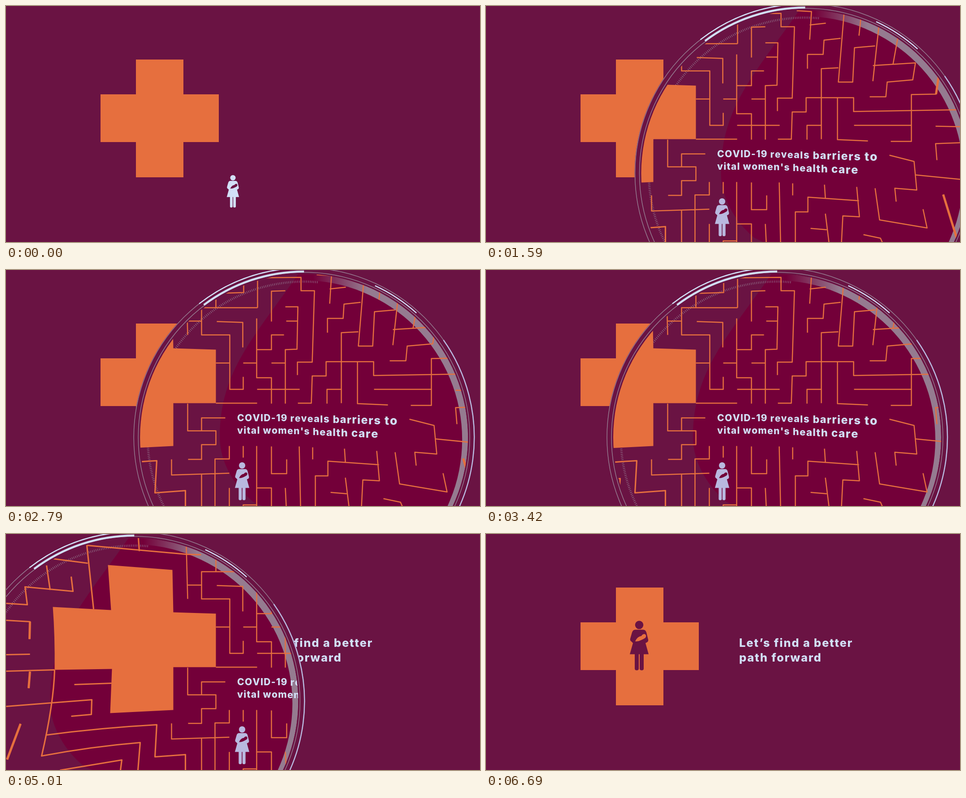
These frames come from a looping animation (1058x529 px, 6.72 s). An HTML page with a canvas:

```html
<!DOCTYPE html>
<html lang="en">
<head>
<meta charset="utf-8">
<title>A better path forward</title>
<style>
html, body { margin: 0; width: 100%; height: 100%; overflow: hidden; background: #6a1343; }
canvas { display: block; }
</style>
</head>
<body>
<canvas id="stage" width="1058" height="529"></canvas>
<script>
const ctx = document.getElementById('stage').getContext('2d');
const W = 1058, H = 529, LOOP = 6720, SWAP_TIME = 4400;
const BG = '#6a1343', CRIMSON = '#730039', ORANGE = '#e66f3e';
const PALE = '#d2dff7', LAVENDER = '#b9b8df', GREY = '#957b90';
const LENS_Y = 375, LENS_R = 381, GLASS_R = 366;

// Lens centre over time: quick entrance, slow drift, quick exit.
const lensKeys = [
  [390, 1442], [1020, 865], [1080, 840], [1710, 700], [2130, 683], [3420, 650],
  [3780, 640], [4380, 552.5], [4470, 528], [5010, 287], [5490, -390]
];

// The maze seen through the glass, by region.
const mazeLeft = new Path2D(`M195 168L180 25L402 45L435 46M295 8L297 38M105 55L182 65M90 70L98 125
  M145 95L149 128L42 118L47 158L0 155M0 193L53 196L52 235M0 270L53 269M0 307L108 304M53 308L50 345
  M152 337L235 334M108 304Q106 380 79 497Q190 476 299 467L294 529M0 386L101 378L191 371L190 404L145 408
  M90 450Q210 434 336 427L332 499L400 494V529M120 529L258 506L255 529M32 425L2 505`);
const mazeCentre = new Path2D(`M402 28L405 145M405 114H436M498 13V18H530V50L468 52V84M499 208H468
  M561 84H436V145H499V267H529V239M561 84V17L658 16V46H688L683 206H650V235M470 115L528 117V173
  M559 108V241H592V299M559 178H592V145H620M529 208H559M592 115V47L623 46M623 82H651L649 177L623 178V299
  M625 114H650M592 208H623M560 267H655M468 298H560M405 299V360H468V391H436V424H406M436 360V331H489`);
const mazeBottom = new Path2D(`M498 394V423H466V529M369 424V459L498 455M436 457V529M498 488V529
  M529 394V420M559 394V529M529 529V526H559M559 488H592V529M592 395V456H626V424M654 395L657 529
  M623 488L625 529M684 397V424M690 529V461H718V428L832 436M827 405L833 472L796 470L793 529M755 400L757 430
  M757 465L765 529M724 498L760 501M842 512L880 520L884 529M868 408L878 479L984 497L975 455`);
const mazeRight = new Path2D(`M693 10L726 12L722 75M722 42L758 38M717 140V108H752L754 76L791 72
  M799 12L786 170H818L822 93L868 89M838 10L832 66M880 12L863 168M863 133L958 127L952 165L895 170L892 203H856
  M926 30L908 130M974 45L965 88L1058 74M786 138L748 140V298M716 299V267H748M651 298H681L683 237H714V205H820V236L1058 232
  M784 205V299L852 302M821 267H949M903 303H949V198L1004 197L1015 122M1003 269L1058 270M1058 306L1003 308L1006 345
  M900 334L955 348L961 412L912 408L915 438M957 378L1058 388`);
const thickWalls = new Path2D('M1020 422L1053 529M53 196L52 235M53 308L50 345M32 425L2 505M1015 122L1004 197');
const bigCross = new Path2D(`M227 69L371 80L373 175L468 178V298H373V394L232 401L236 302L108 304
  Q109 230 104 163L234 170Z`);
const plainCross = new Path2D('M290 120H396V198H475V305H396V384H290V305H211V198H290Z');

// Lit part of the glass, relative to the lens centre.
const litGlass = new Path2D('M-10 -370C-110 -225 -188 -150 -188 0C-188 60 -150 115 -113 145L400 380V-370Z');

// Mother and child, 111 units tall, origin at the top of the head.
const mother = new Path2D(`M-9 20H9Q14 20 16 26L20 42Q21 47 16 49L14 50L21 75H10V107Q10 111 6 111H5Q1 111 1 107
  V75H-1V107Q-1 111 -5 111H-6Q-10 111 -10 107V75H-21L-14 50L-18 46Q-21 44 -20 40L-16 26Q-14 20 -9 20Z`);
mother.arc(0, 9.3, 9.3, 0, Math.PI * 2);
const child = new Path2D('M-9 46Q-4 35 5 34Q8 29 13 30Q17 33 14 38Q10 41 5 43Q-2 47 -9 46Z');

function drawMother(x, y, scale, color, childColor) {
  ctx.save();
  ctx.translate(x, y);
  ctx.scale(scale, scale);
  ctx.fillStyle = color;
  ctx.fill(mother);
  ctx.fillStyle = childColor;
  ctx.fill(child);
  ctx.restore();
}

// Monotone cubic through the keys.
const secants = lensKeys.slice(1).map(([t, x], i) => (x - lensKeys[i][1]) / (t - lensKeys[i][0]));
const slopes = lensKeys.map(([t], i) => {
  if (i === 0) return secants[0] * 1.4;
  if (i === secants.length) return secants[i - 1] * 1.3;
  const before = t - lensKeys[i - 1][0], after = lensKeys[i + 1][0] - t;
  const a = 2 * after + before, b = after + 2 * before;
  return (a + b) / (a / secants[i - 1] + b / secants[i]);
});

function lensX(t) {
  const i = lensKeys.findIndex(([end], k) => k > 0 && t <= end) - 1;
  const [t0, x0] = lensKeys[i], [t1, x1] = lensKeys[i + 1];
  const h = t1 - t0, u = (t - t0) / h, v = 1 - u;
  return x0 * (1 + 2 * u) * v * v + x1 * (3 - 2 * u) * u * u
    + h * u * v * (slopes[i] * v - slopes[i + 1] * u);
}

function setFont(size, spacing) {
  ctx.font = `800 ${size}px Inter, "Open Sans", sans-serif`;
  ctx.letterSpacing = spacing + 'px';
}

// Letters grow and sink towards the right, as if seen through a bulge.
function bulgeText(text, x, baseline, sink) {
  for (const letter of text) {
    const scale = 1 + Math.max(0, x - 660) * 0.0014;
    setFont(21 * scale, 0);
    ctx.fillText(letter, x, baseline + Math.max(0, x - 600) * sink);
    x += ctx.measureText(letter).width + 1.3 * scale;
  }
}

function rim(x, r, from, to, color, width) {
  ctx.beginPath();
  ctx.arc(x, LENS_Y, r, from * Math.PI / 180, to * Math.PI / 180);
  ctx.strokeStyle = color;
  ctx.lineWidth = width;
  ctx.stroke();
}

function drawBackdrop(t) {
  ctx.fillStyle = BG;
  ctx.fillRect(0, 0, W, H);
  ctx.fillStyle = ORANGE;
  ctx.fill(plainCross);
  if (t < SWAP_TIME) {
    drawMother(506.5, 379, 0.655, PALE, BG);
    return;
  }
  drawMother(342, 194.5, 1, BG, ORANGE);
  ctx.fillStyle = PALE;
  setFont(25.5, 1.8);
  ctx.fillText('Let’s find a better', 565, 252.5);
  ctx.fillText('path forward', 565, 285.5);
}

// Lit glass, then a crescent of shade that fades out towards the top.
function drawShading(x) {
  ctx.save();
  ctx.translate(x, LENS_Y);
  ctx.fillStyle = CRIMSON;
  ctx.fill(litGlass);
  const fade = ctx.createLinearGradient(20, 0, 140, 0);
  fade.addColorStop(0, GREY + '00');
  fade.addColorStop(1, GREY);
  ctx.beginPath();
  ctx.arc(0, 0, GLASS_R, 0, Math.PI * 2);
  ctx.arc(-4, 5, 357, 0, Math.PI * 2, true);
  ctx.fillStyle = fade;
  ctx.fill();
  ctx.restore();

  ctx.setLineDash([1, 3]);
  rim(x, 349, 150, 275, GREY, 5);
  ctx.setLineDash([]);
}

function drawMaze() {
  ctx.save();
  ctx.translate(0.5, 0.5);
  ctx.fillStyle = ctx.strokeStyle = ORANGE;
  ctx.fill(bigCross);
  ctx.lineWidth = 2.5;
  for (const walls of [mazeCentre, mazeBottom, mazeRight]) ctx.stroke(walls);
  ctx.lineWidth = 3.2;
  ctx.stroke(mazeLeft);
  ctx.lineWidth = 5;
  ctx.stroke(thickWalls);
  ctx.restore();
}

function drawGlass(x) {
  ctx.save();
  ctx.beginPath();
  ctx.arc(x, LENS_Y, GLASS_R, 0, Math.PI * 2);
  ctx.clip();
  drawShading(x);
  drawMaze();
  ctx.fillStyle = PALE;
  bulgeText('COVID-19 reveals barriers to', 516, 338.5, 0.034);
  bulgeText("vital women's health care", 516, 366.5, 0.045);
  const tinted = x < 715;
  drawMother(527, 431, 0.766, tinted ? LAVENDER : PALE, tinted ? CRIMSON : BG);
  ctx.restore();
}

function drawLens(x) {
  ctx.beginPath();
  ctx.arc(x, LENS_Y, LENS_R, 0, Math.PI * 2);
  ctx.fillStyle = BG;
  ctx.fill();
  drawGlass(x);
  rim(x, 380, 0, 360, GREY, 1.5);
  rim(x, 370, 0, 360, GREY, 1.5);
  rim(x, 380, -35, 50, LAVENDER, 2.5);
  rim(x, 380, 232, 262, PALE, 2.5);
  rim(x, 371.5, 233, 270, PALE, 4.5);
  rim(x, 375, -65, -48, PALE, 2.5);
}

function frame(now) {
  const t = now % LOOP;
  drawBackdrop(t);
  if (t >= lensKeys[0][0] && t <= lensKeys.at(-1)[0]) drawLens(lensX(t));
  requestAnimationFrame(frame);
}

ctx.lineJoin = 'round';
requestAnimationFrame(frame);
</script>
</body>
</html>
```
